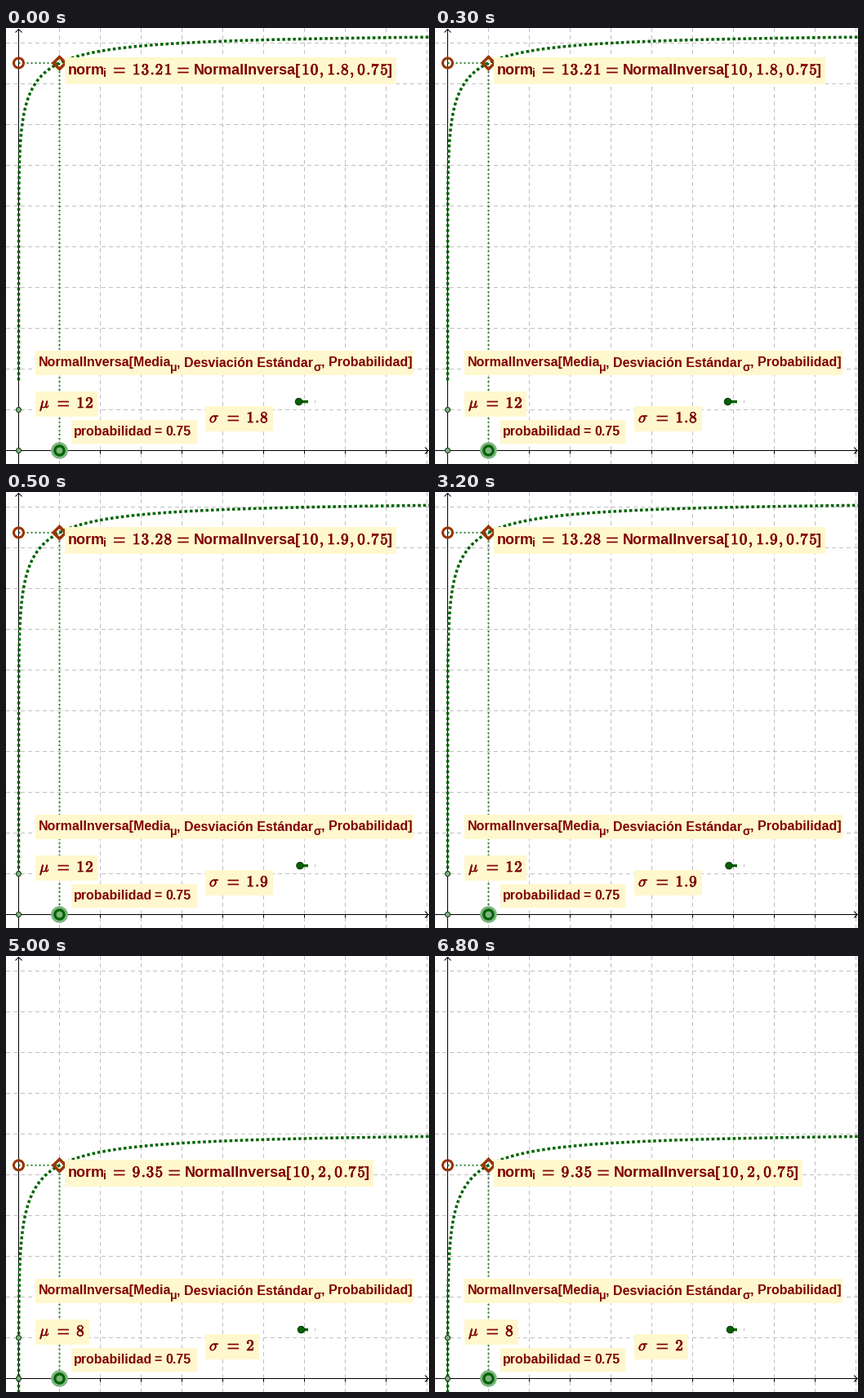
Recreate the animation shown at these times as a matplotlib script. Size 518x535 px, loop 8 s.

```python
import math

import numpy as np
import matplotlib.pyplot as plt
from matplotlib.animation import ArtistAnimation
from matplotlib.patches import Circle, Polygon, Rectangle
from matplotlib.patheffects import withStroke

W, H, DPI = 518, 535, 72          # at 72 dpi one point is one pixel
OX, OY, UNIT = 15.5, 518.5, 50    # origin and grid step in pixels
GREEN, RUST, MAROON = "#006400", "#993300", "#800000"
CREAM, GREY, PALE = "#fff8ce", "#c0c0c0", "#80b280"
EM = 19
ADVANCE = {".": 0.319 * EM, ",": 0.49 * EM}

plt.rcParams.update({
    "mathtext.fontset": "cm",
    "font.family": "Liberation Sans",
    "lines.scale_dashes": False,
    "path.snap": False,
    "toolbar": "None",
})

fig = plt.figure(figsize=(W / DPI, H / DPI), dpi=DPI, facecolor="white")
ax = fig.add_axes([0, 0, 1, 1])
ax.set(xlim=(0, W), ylim=(H, 0))
ax.axis("off")


def line(xs, ys, color=GREEN, lw=1.0, z=1, dashes=None, **kw):
    item, = ax.plot(xs, ys, color=color, lw=lw, zorder=z,
                    dash_capstyle="butt", solid_capstyle="butt", **kw)
    if dashes:
        item.set_linestyle((0, dashes))
    return item


def disc(x, y, r, face, edge="none", lw=0.0, z=5):
    return ax.add_patch(Circle((x, y), r, fc=face, ec=edge, lw=lw, zorder=z))


def box(x0, y0, x1, y1):
    return ax.add_patch(Rectangle((x0, y0), x1 - x0, y1 - y0, fc=CREAM,
                                  ec="none", lw=0, zorder=7))


def label(x, y, s, size=16):
    return ax.text(x, y, s, size=size, weight="bold", color=MAROON, zorder=8)


def symbol(x, y, s, stroke, ha="left"):
    return ax.text(x, y, f"${s}$", size=EM, color=MAROON, ha=ha, zorder=8,
                   path_effects=[withStroke(linewidth=stroke, foreground=MAROON)])


def equals(x, y):
    return [line([x, x + 13.5], [y - d, y - d], MAROON, 1.7, 8) for d in (7.5, 2.5)]


def number(x, y, s):
    """Set bold figures from pen position x; return artists and the end position."""
    items = []
    for ch in s:
        step = ADVANCE.get(ch, 0.575 * EM)
        mid = x + (0.16 * EM if ch in ".," else step / 2)
        items.append(symbol(mid, y, rf"\mathbf{{{ch}}}", 0.8, "center"))
        x += step
    return items, x


def short(v):
    return f"{v:g}"


def curve(mu, sigma, z_min):
    """Normal quantile of p = x / (6x + 6), traced along its z score."""
    z = np.linspace(z_min, -0.99, 3000)
    p = np.array([0.5 * math.erfc(-v / math.sqrt(2)) for v in z])
    x = 6 * p / (1 - 6 * p)
    px, py = OX + UNIT * x, OY - UNIT * (mu + sigma * z)
    keep = px < W + 20
    return line(px[keep], py[keep], GREEN, 3.5, 3, (3.5, 3))


def backdrop():
    for k in range(1, 11):
        x, y = OX + UNIT * k, OY - UNIT * k
        line([x, x], [0, H], GREY, 1, 0, (5, 4))
        line([0, W], [y, y], GREY, 1, 0, (5, 4))
        line([x, x], [OY, OY + 4], "black")
    line([OX, OX], [1, H], "black")
    line([0, W], [OY, OY], "black")
    line([OX - 4, OX, OX + 4], [5.5, 1.5, 5.5], "black")
    line([W - 5, W - 1, W - 5], [OY - 4, OY, OY + 4], "black")

    for y in (OY - UNIT, OY):
        disc(OX, y, 3, PALE, "#1c3f1c", 1.1)
    disc(OX + UNIT, OY, 10.3, PALE)
    disc(OX + UNIT, OY, 5.6, PALE, GREEN, 3.2)

    line([361, 370], [458.5, 458.5], GREEN, 3.5, 4)
    line([378.5, 378.5], [457, 460], "#a8c8a8", 1, 4)

    box(36, 396, 499, 426)
    label(39.5, 415, "NormalInversa[Media")
    label(201, 421, "μ", 14)
    label(209, 415, ", Desviación Estándar")
    label(376.5, 421, "σ", 14)
    label(385.5, 415, ", Probabilidad]")
    box(80, 481, 234, 510)
    label(83, 500, "probabilidad")
    label(181.5, 500, "=")
    label(195.5, 500, "0.75")


def setting(x, y, name, value):
    """A labelled parameter such as 'mu = 12' on its cream box."""
    eq = x + 22.5
    figs, end = number(eq + 22.5, y, short(value))
    return [box(x - 5, y - 20, round(end + 4.6), y + 11),
            symbol(x, y, name, 0.6), *equals(eq, y), *figs]


def result(y, mu, sigma):
    """The formula line that rides beside the diamond."""
    base = round(y + 14.3)
    value, end = number(154.5, base, f"{mu + 0.67449 * sigma:.2f}")
    args, stop = number(end + 157.5, base, f"10,{short(sigma)},0.75")
    return [box(72, base - 21, round(stop + 8.6), base + 12),
            label(76, base, "norm", 18), label(118.5, base + 3, "i", 14),
            *equals(132, base), *value, *equals(end + 6, base),
            label(end + 25.5, base, "NormalInversa[", 18),
            *args, label(stop - 2.5, base, "]", 18)]


def scene(mu, sigma, z_min, knob):
    y = OY - UNIT * (mu - 1.383 * sigma)
    x, r = OX + UNIT, 7.5
    diamond = Polygon([(x - r, y), (x, y - r), (x + r, y), (x, y + r)],
                      fc="none", ec=RUST, lw=3.5, zorder=5)
    return [
        curve(mu, sigma, z_min),
        line([OX, x], [y, y], GREEN, 2, 2, (2, 3), alpha=0.8),
        line([x, x], [y, OY], GREEN, 2, 2, (2, 3), alpha=0.8),
        ax.add_patch(diamond),
        disc(OX, y, 6, "none", RUST, 3),
        disc(knob, 458.5, 4.2, GREEN, "#0a300a", 1),
        *result(y, mu, sigma),
        *setting(41, 466, r"\mu", mu),
        *setting(249, 484, r"\sigma", sigma),
    ]


backdrop()
first = scene(12, 1.8, -5.71, 358.5)
second = scene(12, 1.9, -5.79, 360)
third = scene(8, 2, -5.8, 361.5)

frames = [first] + [second] * 9 + [third] * 6
anim = ArtistAnimation(fig, frames, interval=500, repeat=True, repeat_delay=0, blit=False)

plt.show()
```
